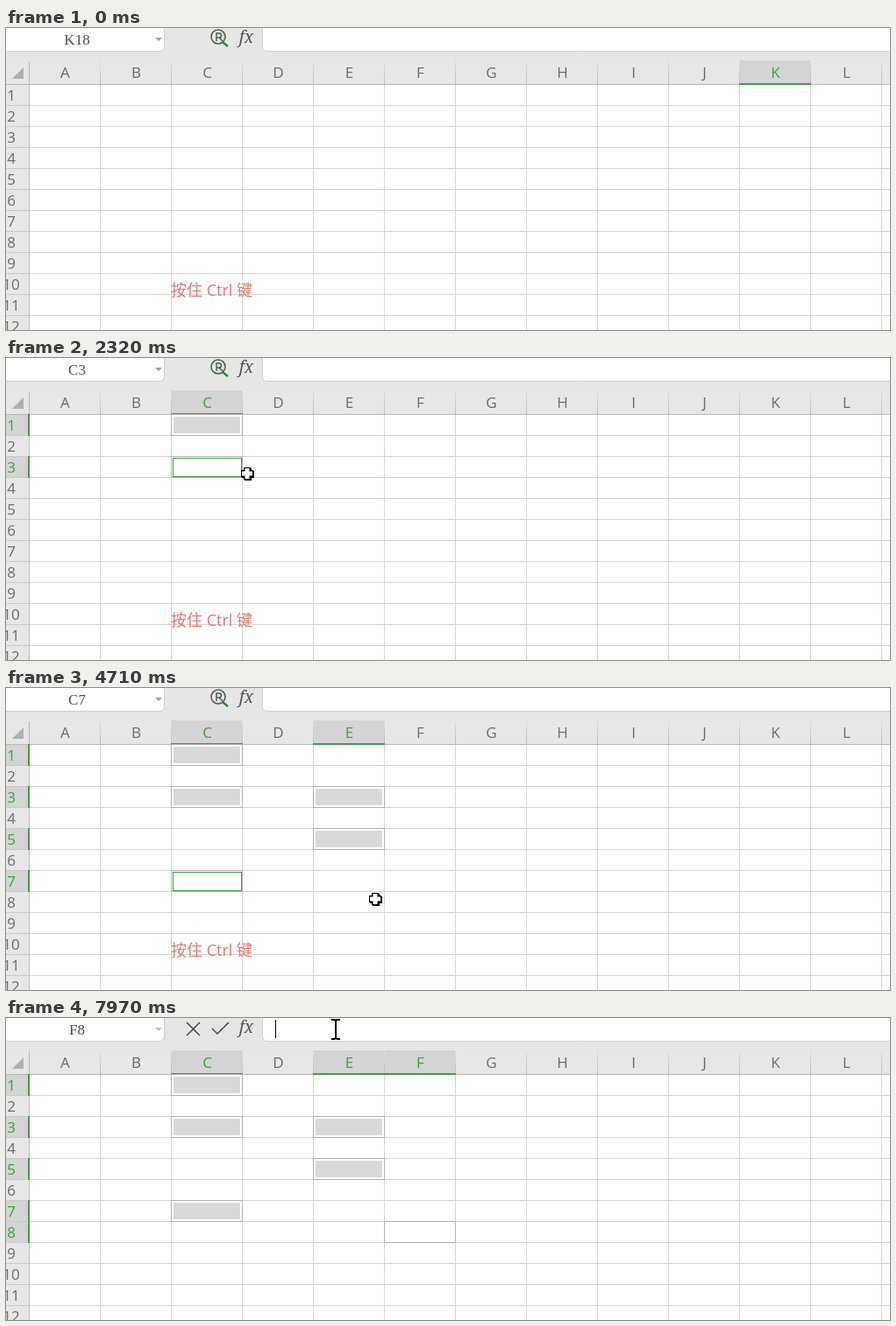
These frames come from a looping animation (1008x345 px, 8000 ms). An HTML page with a canvas:

```html
<!DOCTYPE html>
<html lang="zh">
<head>
<meta charset="utf-8">
<style>
html, body { margin: 0; width: 100%; height: 100%; overflow: hidden; background: #fff; }
canvas { display: block; }
</style>
</head>
<body>
<canvas id="sheet" width="1008" height="345"></canvas>
<script>
const LOOP = 8000, W = 1008, H = 345;
const LEFT = 26, TOP = 64, COL = 81, ROW = 24;
const GREEN = '#3fa142', HEADER = '#e7e7e7', ACTIVE = '#d4d4d4', GRID = '#d4d4d4';
const ctx = document.getElementById('sheet').getContext('2d');

// [time, cell]
const clicks = [[980, 'C1'], [2090, 'C3'], [2700, 'E3'], [3400, 'E5'], [4330, 'C7'], [4940, 'F8']];
const HINT_END = 6180, EDIT_START = 6890;

// [first step, last step, step count, x, y]
const moves = [
  [130, 130, 1, 811, 318], [200, 830, 9, 213, 81],
  [1620, 1620, 1, 214, 81], [1690, 1920, 4, 237, 130],
  [2320, 2470, 3, 325, 134], [2550, 2620, 2, 378, 125],
  [3020, 3250, 4, 396, 173],
  [3790, 4020, 4, 286, 220], [4100, 4330, 4, 247, 223],
  [4480, 4790, 5, 475, 247],
  [5800, 6490, 10, 378, 21], [6570, 6570, 1, 377, 17], [6650, 6720, 2, 376, 13]
];
const ease = p => p * (2 - p) * 0.6 + p * p * (3 - 2 * p) * 0.4;

function pointerAt(t) {
  if (t < moves[0][0]) return null;
  let [, , , x, y] = moves[0];
  for (const [t0, t1, n, tx, ty] of moves) {
    if (t < t0) break;
    const step = n > 1 ? Math.floor((t - t0) / (t1 - t0) * (n - 1) + 1e-6) : 0;
    const p = ease(Math.min(1, (step + 1) / n));
    x += (tx - x) * p;
    y += (ty - y) * p;
  }
  return [Math.round(x), Math.round(y)];
}

function box(color, x, y, w, h) {
  ctx.fillStyle = color;
  ctx.fillRect(x, y, w, h);
}
function frame(color, x, y, w, h, line = 1) {
  ctx.strokeStyle = color;
  ctx.lineWidth = line;
  ctx.strokeRect(x + line / 2, y + line / 2, w - line, h - line);
}
function label(text, x, y, font, color, align = 'center') {
  ctx.font = font;
  ctx.fillStyle = color;
  ctx.textAlign = align;
  ctx.fillText(text, x, y);
}
function stroke(color, width, d) {
  ctx.strokeStyle = color;
  ctx.lineWidth = width;
  ctx.stroke(new Path2D(d));
}
function parse(cell) {
  const col = cell.charCodeAt(0) - 65, row = cell.slice(1) - 1;
  return { col, row, x: LEFT + col * COL, y: TOP + row * ROW };
}

function drawToolbar(name, editing) {
  box('#e6e6e6', 0, 0, W, 37);
  ctx.fillStyle = '#fff';
  ctx.strokeStyle = '#cfcfcf';
  ctx.lineWidth = 1;
  for (const [x, w] of [[-10, 190.5], [292.5, 740]]) {
    ctx.beginPath();
    ctx.roundRect(x, -10, w, 36.5, 5);
    ctx.fill();
    ctx.stroke();
  }
  label(name, 81, 19, '17px "Liberation Serif", serif', '#505050');
  ctx.fillStyle = editing ? '#c4c4c4' : '#a0a0a0';
  ctx.fill(new Path2D('M170 11h8l-4 4z'));
  if (editing) {
    stroke('#484848', 1.5, 'M206 5l15 15M221 5l-15 15M235 12l6 6L254 5');
  } else {
    stroke('#4d6650', 1.6, 'M250 10a8 8 0 1 1-16 0a8 8 0 1 1 16 0');
    stroke('#3f8048', 2.4, 'M247 16l6 5');
    stroke('#4d6650', 1.5, 'M240 15V6h3a2.5 2.5 0 0 1 0 5h-3M243 11l4 4');
  }
  label('fx', 274, 17, 'italic 19px "Noto Serif", serif', '#555');
}

function drawGrid(cells) {
  const cols = new Set(cells.map(c => c.col)), rows = new Set(cells.map(c => c.row));
  const font = '17px "Open Sans", "Noto Sans", sans-serif';
  box(HEADER, 0, 37, W, 28);
  box(HEADER, 0, TOP, LEFT, H);
  for (let c = 0; c <= 12; c++) {
    const x = LEFT + c * COL;
    if (cols.has(c)) box(ACTIVE, x, 37, COL, 27);
    const fade = ctx.createLinearGradient(0, 38, 0, TOP);
    fade.addColorStop(0, '#dedede');
    fade.addColorStop(1, '#bcbcbc');
    box(fade, x, 38, 1, 26);
    box(GRID, x, TOP, 1, H);
    if (c < 12) label(String.fromCharCode(65 + c), x + 41.5, 57, font, cols.has(c) ? GREEN : '#6c6c6c');
  }
  for (let r = 0; r < 12; r++) {
    const y = TOP + r * ROW;
    if (rows.has(r)) box(ACTIVE, 0, y, LEFT, ROW);
    box('#cacaca', 0, y, LEFT, 1);
    box(GRID, LEFT, y, W, 1);
    label(r + 1, 6, y + 19, font, rows.has(r) ? GREEN : '#6c6c6c');
  }
  box('#b9b9b9', 0, TOP, W, 1);
  box('#b9b9b9', LEFT, 38, 1, H);
  ctx.fillStyle = '#b0b0b0';
  ctx.fill(new Path2D('M20 45v13H7z'));
  for (const c of cols) box(GREEN, LEFT + c * COL, 63, COL + 1, 2);
  for (const r of rows) box(GREEN, 25, TOP + r * ROW, 2, ROW + 1);
}

function drawSelection(cells, editing) {
  if (cells.length === 1) {
    const { x, y } = cells[0];
    frame(GREEN, x - 1, y - 1, COL + 3, ROW + 3, 3);
    box('#fff', x + COL - 3, y + ROW - 3, 6, 6);
    box(GREEN, x + COL - 2, y + ROW - 2, 5, 5);
    return;
  }
  cells.forEach(({ x, y }, i) => {
    frame('#b2b2b2', x, y, COL + 1, ROW + 1);
    if (i < cells.length - 1) box('#d9d9d9', x + 3, y + 3, COL - 5, ROW - 5);
    else if (!editing) frame(GREEN, x + 2, y + 2, COL - 2, ROW - 2);
  });
}

function drawPointer([x, y]) {
  ctx.save();
  ctx.translate(x, y);
  if (y < 30) {
    const beam = 'M-5-11h3q2 0 2 2q0-2 2-2h3M0-9V9M-5 11h3q2 0 2-2q0 2 2 2h3';
    stroke('#fff', 4, beam);
    stroke('#000', 2, beam);
  } else {
    const plus = (color, r, a, d = 0) => {
      box(color, d - r, d - a, 2 * r, 2 * a);
      box(color, d - a, d - r, 2 * a, 2 * r);
    };
    plus('#000', 7, 4, 1);
    plus('#000', 7, 4);
    plus('#fff', 6, 2.5);
  }
  ctx.restore();
}

function draw(t) {
  const done = clicks.filter(([at]) => t >= at).map(([, cell]) => cell);
  const names = done.length ? done : ['K18'];
  const cells = names.map(parse);
  const editing = t >= EDIT_START;
  box('#fff', 0, 0, W, H);
  drawToolbar(names[names.length - 1], editing);
  drawGrid(cells);
  drawSelection(cells, editing);
  if (t < HINT_END) {
    label('按住 Ctrl 键', 188, 306, '18px "Open Sans", "Noto Sans CJK SC", "Noto Sans CJK", sans-serif', '#df7a70', 'left');
  }
  if (editing && (t < 7420 || t >= 7970)) box('#000', 307, 2, 1, 21);
  const pointer = pointerAt(t);
  if (pointer) drawPointer(pointer);
}

const start = performance.now();
function tick() {
  draw((performance.now() - start) % LOOP);
  requestAnimationFrame(tick);
}
tick();
</script>
</body>
</html>
```
